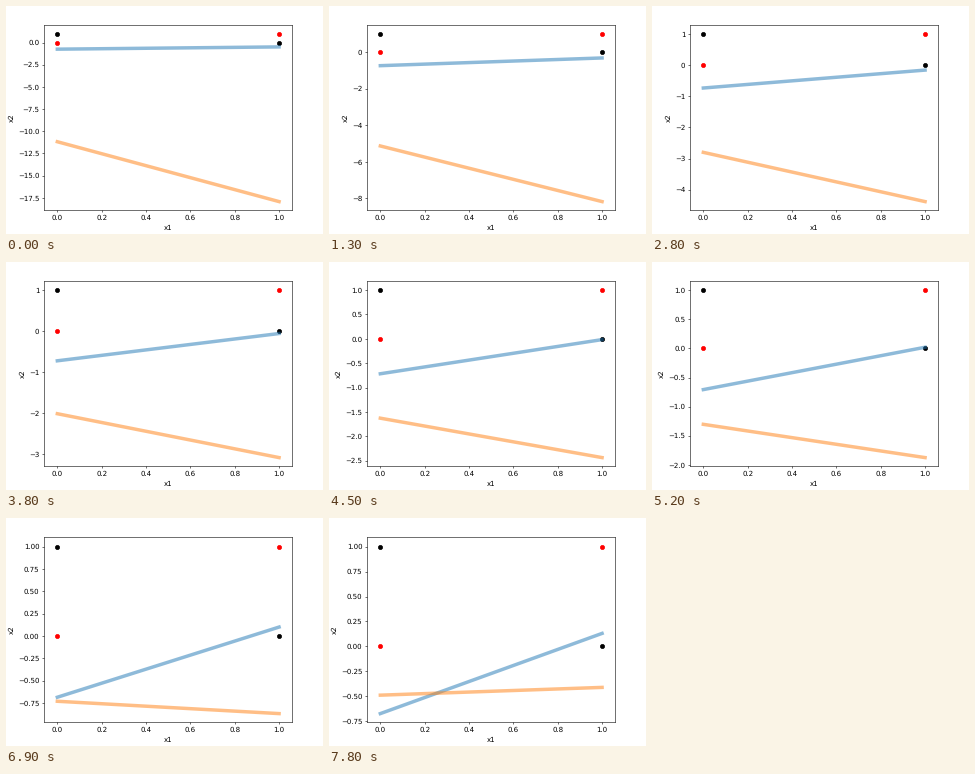
A matplotlib script that plays this animation: 317x228 px, repeating every 8000 ms.

```python
import matplotlib.pyplot as plt
import numpy as np
from matplotlib.animation import FuncAnimation

W, H, DPI = 317, 228, 50
TICK_MS, FRAMES = 100, 80
LEFT, RIGHT, TOP, BOTTOM = 38.2, 286.2, 19.2, 204.0
PAD_X, PAD_Y = 0.0084, 0.0113  # marker radius counted in the data limits
MARGIN = 0.05
ROUNDING = 0.01  # keeps the pixel size from being truncated

# Ticks at which the next training step appears
STEPS = np.array([1, 3, 4, 6, 8, 9, 11, 13, 15, 17, 18, 20, 21, 23, 24, 27, 28,
                  31, 32, 34, 35, 37, 38, 40, 41, 43, 45, 47, 49, 50, 52,
                  54, 56, 58, 60, 62, 64, 65, 67, 69, 71, 73, 75, 76, 78])

# Heights of both boundaries at x1 = 0 and x1 = 1 after some steps
KEYS = np.array([0, 8, 17, 23, 31, 40, 45])
BLUE_0 = np.array([-0.745, -0.742, -0.735, -0.725, -0.708, -0.685, -0.675])
BLUE_1 = np.array([-0.49, -0.32, -0.16, -0.06, 0.02, 0.10, 0.13])
ORANGE_0 = np.array([-11.18, -5.13, -2.80, -2.015, -1.305, -0.73, -0.49])
ORANGE_1 = np.array([-17.93, -8.17, -4.38, -3.085, -1.877, -0.868, -0.412])


def hermite(step, values):
    """Smooth curve through the key values."""
    slopes = np.gradient(values, KEYS)
    i = min(np.searchsorted(KEYS, step, side="right") - 1, len(KEYS) - 2)
    h = KEYS[i + 1] - KEYS[i]
    u = (step - KEYS[i]) / h
    return ((1 + 2 * u) * (1 - u) ** 2 * values[i]
            + u * (1 - u) ** 2 * h * slopes[i]
            + u * u * (3 - 2 * u) * values[i + 1]
            + u * u * (u - 1) * h * slopes[i + 1])


def decay(step, values):
    return -np.exp(hermite(step, np.log(-values)))


def padded(low, high):
    pad = MARGIN * (high - low)
    return low - pad, high + pad


plt.rcParams["font.family"] = "DejaVu Sans"
plt.rcParams["text.hinting"] = "none"

fig = plt.figure(figsize=((W + ROUNDING) / DPI, (H + ROUNDING) / DPI),
                 dpi=DPI, facecolor="white")
ax = fig.add_axes([LEFT / W, 1 - BOTTOM / H, (RIGHT - LEFT) / W, (BOTTOM - TOP) / H])
ax.scatter([0, 1], [0, 1], color="red")
ax.scatter([0, 1], [1, 0], color="black")
blue, = ax.plot([], [], color="C0", lw=5, alpha=0.5)
orange, = ax.plot([], [], color="C1", lw=5, alpha=0.5)
ax.set_xlim(*padded(-PAD_X, 1 + PAD_X))
ax.set_xlabel("x1")
ax.set_ylabel("x2")


def update(frame):
    step = np.searchsorted(STEPS, frame, side="right")
    blue_y = [hermite(step, BLUE_0), hermite(step, BLUE_1)]
    orange_y = [decay(step, ORANGE_0), decay(step, ORANGE_1)]
    blue.set_data([0, 1], blue_y)
    orange.set_data([0, 1], orange_y)
    ax.set_ylim(*padded(min(blue_y + orange_y), 1 + PAD_Y))
    return blue, orange


anim = FuncAnimation(fig, update, frames=FRAMES, interval=TICK_MS,
                     repeat=True, repeat_delay=0, blit=False)
plt.show()
```
